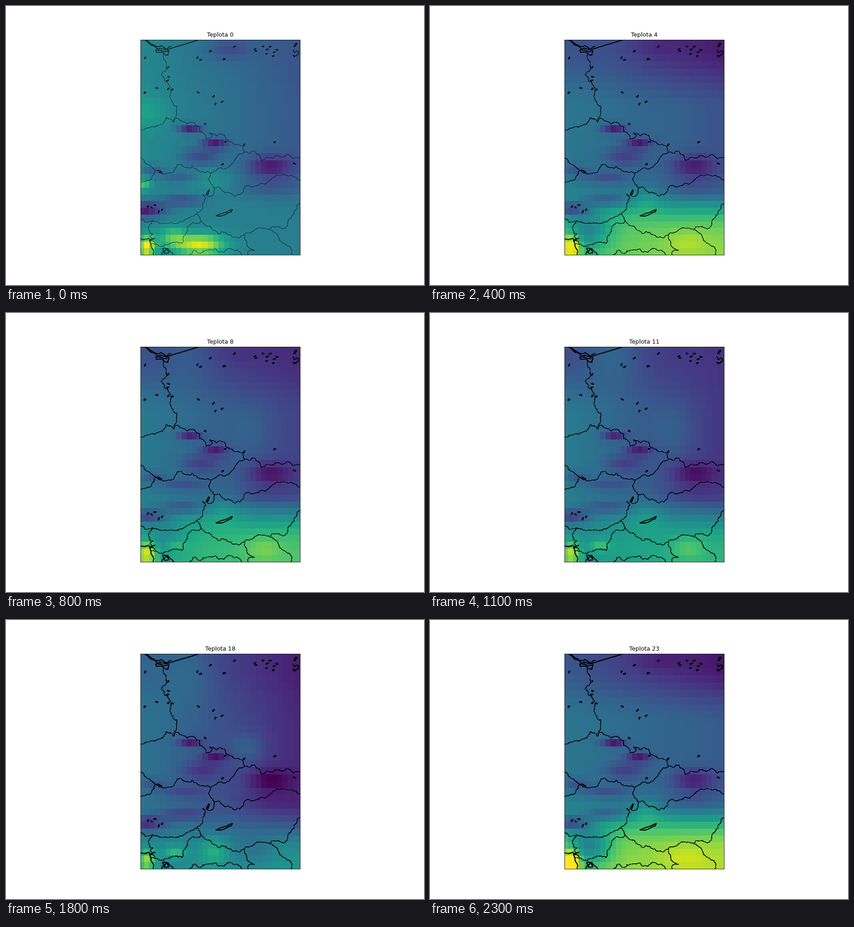
Write a matplotlib script that moves like this. It is 917x611 px and loops after 2400 ms.

```python
import numpy as np
import matplotlib.pyplot as plt
from matplotlib.animation import FuncAnimation
from matplotlib.collections import LineCollection

W, H, DPI = 917, 611, 64
PT = 72 / DPI  # points per pixel
LEFT, RIGHT, TOP, BOTTOM = 294.7, 644.7, 73.3, 544.3
rng = np.random.default_rng(5)

# ---- temperature field on a Mercator-like grid ----
k = np.arange(32)
x_edges = 290.6 + 11.68 * k
y_edges = 73 + 15.95 * k - 0.0244 * k**2
X, Y = np.meshgrid((x_edges[1:] + x_edges[:-1]) / 2,
                   (y_edges[1:] + y_edges[:-1]) / 2)
EAST = (X - LEFT) / (RIGHT - LEFT)


def bump(x, y, sx, sy, amp):
    return amp * np.exp(-((X - x) / sx) ** 2 / 2 - ((Y - y) / sy) ** 2 / 2)


# Mountains are cold in every weather, the Adriatic corner is warm
RELIEF = sum(bump(*b) for b in [
    (403, 268, 18, 7, -.32), (458, 300, 20, 9, -.30), (425, 330, 30, 14, -.18),
    (320, 358, 18, 9, -.16), (385, 375, 35, 10, -.15), (578, 351, 34, 17, -.25),
    (575, 398, 45, 14, -.10), (305, 446, 30, 12, -.38), (385, 425, 34, 10, -.20),
    (308, 526, 14, 16, .55),
])


def weather(north, middle, south, front, relief, *spots):
    """Blend three west-east slopes from north to south and add the relief."""
    slope = [a + (b - a) * EAST for a, b in (north, middle, south)]
    u = np.clip((Y - 90) / 140, 0, 1)
    field = slope[0] + (slope[1] - slope[0]) * u * u * (3 - 2 * u)
    field += (slope[2] - field) / (1 + np.exp((front - Y) / 20))
    field += relief * RELIEF + sum(bump(*s) for s in spots)
    return np.clip(field, 0, 1)


midnight = weather(
    (.46, .25), (.48, .27), (.45, .42), 400, 1,
    (310, 232, 30, 25, .10), (300, 390, 12, 9, .25), (445, 380, 38, 18, .12),
    (425, 522, 38, 16, .52), (365, 505, 22, 16, .25), (485, 95, 32, 15, -.12))
warm_south = weather(
    (.27, .05), (.39, .28), (.80, .88), 440, .9,
    (348, 495, 34, 30, -.35), (475, 420, 22, 18, .12), (560, 520, 35, 18, .08),
    (500, 90, 35, 15, -.05))
midday = weather(
    (.22, .16), (.42, .14), (.50, .62), 445, .7,
    (372, 508, 16, 9, .18), (400, 95, 45, 45, .13), (535, 255, 30, 40, .07),
    (565, 515, 26, 18, .13), (475, 445, 28, 20, .10))
evening = weather(
    (.32, .08), (.38, .11), (.46, .53), 460, .7,
    (370, 508, 18, 9, .20), (400, 110, 40, 60, .08), (530, 280, 25, 25, .10),
    (455, 505, 20, 20, .16), (540, 505, 35, 25, -.10))

HOURS = [0, 2, 12, 18, 23]
POSES = [midnight, warm_south, midday, evening, warm_south]


def field_at(hour):
    weights = [np.interp(hour, HOURS, row) for row in np.eye(len(HOURS))]
    return sum(w * p for w, p in zip(weights, POSES))


# ---- map lines ----
borders, shores = [], []


def crinkle(a, b, rough):
    """Midpoint displacement between two points, without the last one."""
    d = b - a
    if np.hypot(*d) < 3.5:
        return [a]
    mid = (a + b) / 2 + rng.uniform(-rough, rough) * np.array([-d[1], d[0]])
    return crinkle(a, mid, rough) + crinkle(mid, b, rough)


def path(group, rough, *pts):
    pts = np.array(pts, float)
    line = [p for a, b in zip(pts, pts[1:]) for p in crinkle(a, b, rough)]
    group.append(np.array(line + [pts[-1]]))


def border(*pts):
    path(borders, 0.22, *pts)


def shore(*pts, rough=0.15):
    path(shores, rough, *pts)


def lakes(n, x0, x1, y0, y1):
    a = np.linspace(0, 2 * np.pi, 8)
    for x, y in rng.uniform((x0, y0), (x1, y1), (n, 2)):
        r = rng.uniform(0.6, 1.2, 8)
        r[-1] = r[0]
        z = r * (2.7 * np.cos(a) + 0.9j * np.sin(a))
        z *= np.exp(1j * rng.uniform(-1.2, 0.5))
        shores.append(np.column_stack([x + z.real, y + z.imag]))


# Corners where several borders meet
LUSATIA, BESKIDS, MORAVA, SUMAVA = (367, 254), (522, 321), (449, 366), (327, 359)
DANUBE, RABA, MURA, DRAVA, TISA = (456, 397), (417, 455), (428, 471), (523, 500), (577, 489)
TARVISIO = (321, 470)

border((346, 104), (351, 128), (340, 150), (357, 172), (362, 206), (374, 235), LUSATIA)
border((295, 272), (317, 264), (347, 252), (350, 244), LUSATIA, (374, 245),
       (396, 258), (425, 264), (424, 275), (438, 291), (452, 283), (446, 277),
       (479, 282), (483, 293), (510, 303), BESKIDS)
border(BESKIDS, (511, 323), (494, 345), (463, 357), MORAVA)
border(MORAVA, (418, 356), (375, 347), (367, 364), (342, 366), SUMAVA)
border((295, 332), (306, 343), SUMAVA, (325, 369), (308, 381), (295, 385))
border(BESKIDS, (545, 317), (560, 338), (573, 331), (607, 331), (616, 325), (646, 331))
border(MORAVA, (445, 376), DANUBE, (480, 409), (521, 406), (522, 397),
       (545, 394), (577, 384), (586, 374), (625, 370), (646, 380))
border(DANUBE, (455, 411), (431, 412), (438, 420), (430, 445), RABA)
border(RABA, (398, 464), (355, 475), TARVISIO, (295, 466))
border(TARVISIO, (312, 487), (322, 499), (316, 505), (327, 519))
border((317, 522), (369, 517), (386, 520), (389, 503), (397, 489), MURA)
border(RABA, MURA, (464, 498), (497, 506), DRAVA, (545, 490), TISA,
       (606, 487), (625, 463), (646, 429))
border(DRAVA, (526, 513), (530, 527), (545, 534), (532, 536), (531, 545))
border((402, 545), (411, 534), (426, 542), (440, 534), (478, 539), (512, 538), (517, 545))
border(TISA, (596, 503), (608, 519), (626, 538), (624, 545))

# Baltic coast, lagoon and the Adriatic
shore((352, 95), (385, 85), (421, 74), rough=0.02)
shore((299, 73), (316, 81), (330, 88), (340, 86), (352, 95))
shore((305, 75), (327, 89), (343, 98), (357, 97), (355, 107), (330, 101),
      (328, 96), (352, 95), (362, 88))
shore((295, 509), (313, 508), (315, 513), (326, 508), (315, 515), (320, 530), (323, 545))
shore((341, 545), (347, 536), (343, 531), (355, 531), (368, 545))
shore((345, 539), (351, 532), (357, 540), (346, 541))
# Long lakes and reservoirs
shore((460, 459), (480, 452), (496, 445), (494, 450), (470, 460), (460, 459), rough=0.06)
shore((444, 402), (439, 411), (442, 413), (445, 402))
shore((331, 359), (341, 363), (335, 364), (343, 367))
shore((629, 96), (639, 98), (629, 107), (632, 112), rough=0.4)
# Small lakes, scattered by region
lakes(9, 300, 372, 112, 193)
lakes(6, 405, 505, 88, 120)
lakes(9, 543, 610, 84, 111)
lakes(3, 630, 637, 80, 90)
lakes(5, 410, 505, 160, 265)
lakes(5, 450, 640, 272, 350)
lakes(5, 308, 342, 402, 466)

# ---- figure ----
fig = plt.figure(figsize=(W / DPI, H / DPI), dpi=DPI, facecolor="white")
# Map units are pixel indices, whose centres lie half a pixel further
ax = fig.add_axes([(LEFT + 0.5) / W, 1 - (BOTTOM + 0.5) / H,
                   (RIGHT - LEFT) / W, (BOTTOM - TOP) / H])
mesh = ax.pcolormesh(x_edges, y_edges, field_at(0), cmap="viridis", vmin=0, vmax=1)
ax.set(xlim=(LEFT, RIGHT), ylim=(BOTTOM, TOP), xticks=[], yticks=[])
for spine in ax.spines.values():
    spine.set_linewidth(0.85 * PT)
title = ax.set_title("", fontname="DejaVu Sans", fontsize=12.73 * PT, pad=7 * PT)

shore_lines = LineCollection([], colors="black", linewidths=1.3 * PT)
border_lines = LineCollection([], colors="black", linewidths=0.65 * PT)
for lines in (shore_lines, border_lines):
    ax.add_collection(lines, autolim=False)


def update(hour):
    mesh.set_array(field_at(hour))
    # The outlines are drawn once more every hour, so they darken
    shore_lines.set_segments(shores * (hour + 1))
    border_lines.set_segments(borders * (hour + 1))
    title.set_text(f"Teplota {hour}")
    return mesh, shore_lines, border_lines, title


anim = FuncAnimation(fig, update, frames=24, interval=100, repeat=True,
                     repeat_delay=0, blit=False)
plt.show()
```
